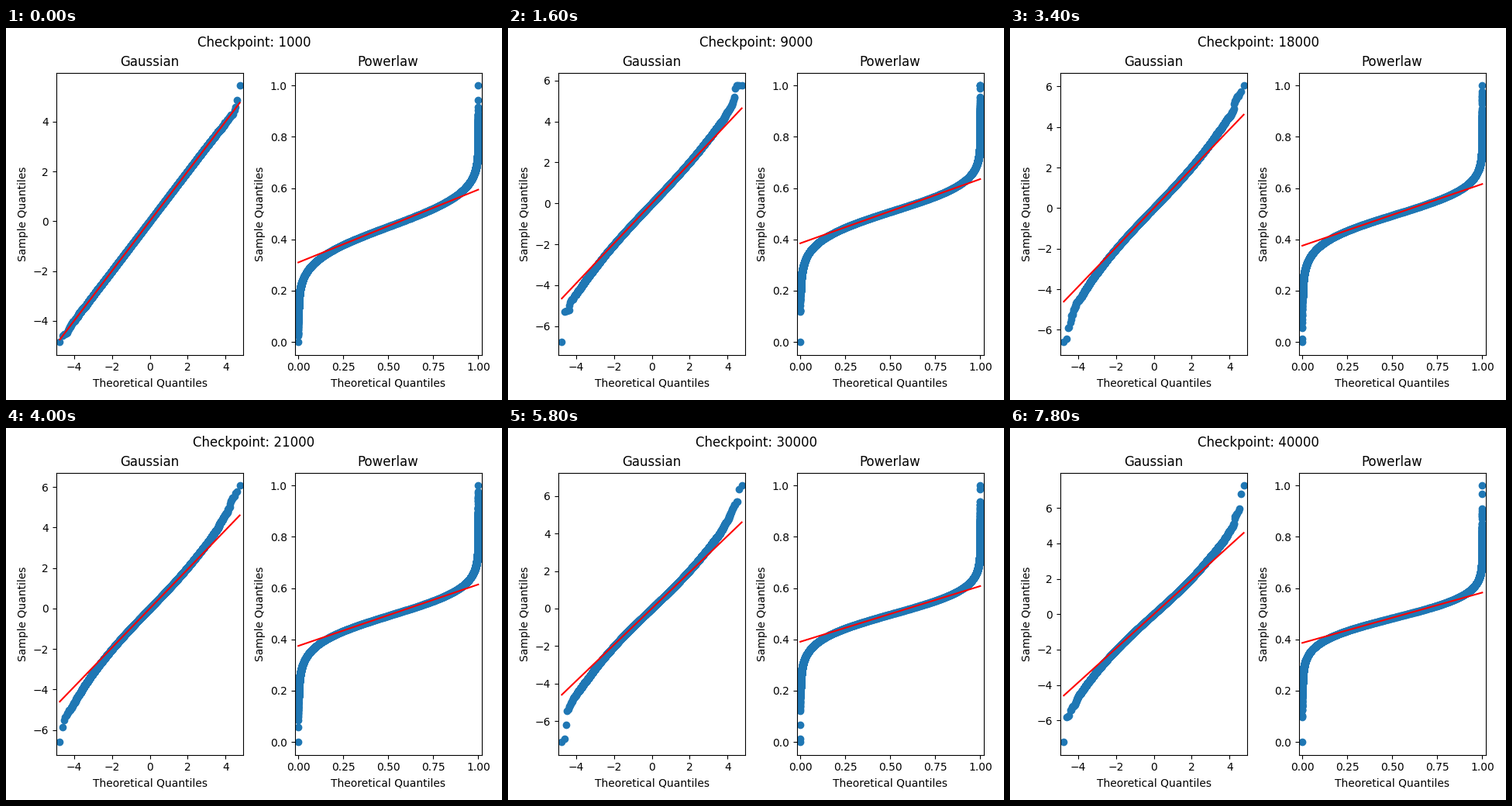
Write a matplotlib script that moves like this. It is 640 px wide and 480 px high and loops after 8000 ms.

```python
import math

import numpy as np
import matplotlib.pyplot as plt
from matplotlib.animation import FuncAnimation

FRAMES, STEP_MS = 40, 200
N = 1_000_000          # sample size behind the quantile plots
QUARTILE = 0.67449     # upper quartile of the standard normal

# Key points over the frames: smallest value, largest value, power-law exponent.
KEY = [0, 8, 13, 20, 24, 33, 39]
LOWEST = [-4.85, -6.77, -6.6, -6.6, -7.06, -7.16, -7.22]
HIGHEST = [5.45, 5.76, 6.0, 6.08, 6.07, 6.95, 7.27]
EXPONENT = [1.27, 1.56, 1.49, 1.49, 1.4, 1.44, 1.29]

# Inverse normal CDF for p <= 0.5, interpolated in log p.
Z_GRID = np.linspace(-6.5, 0, 3001)
LOG_P = np.log([0.5 * math.erfc(-z / math.sqrt(2)) for z in Z_GRID])


def half_ppf(p):
    return np.interp(np.log(p), LOG_P, Z_GRID)


def both_sides(low):
    return np.concatenate([low, -low[::-1]])


# Ranks counted from either end: every point in the tails, sparser inside.
RANKS = np.unique(np.round(np.geomspace(1, N / 2, 2000)))
P_LOW = RANKS / (N + 1)
PROB = np.concatenate([P_LOW, 1 - P_LOW[::-1]])
Z_THEORY = both_sides(half_ppf(P_LOW))


def bend(z, c):
    """Unit-variance quantile curve whose tails grow heavier with c."""
    s = math.sqrt(1 - 6 * c * c) - 3 * c
    outer = np.maximum(np.abs(z) - 4, 0) ** 2
    return s * z + c * z ** 3 + np.where(z < 0, -130, 60) * c * outer


def noisy_half(rng):
    """Normal order statistics of one random half of the sample."""
    r = np.cumsum(rng.gamma(np.diff(RANKS, prepend=0)))
    return half_ppf(r / N)


def sample(i, c):
    rng = np.random.default_rng(100 + i)
    z = np.concatenate([noisy_half(rng), -noisy_half(rng)[::-1]])
    low, high = np.interp(i, KEY, LOWEST), np.interp(i, KEY, HIGHEST)
    y = np.clip(np.sort(bend(z, c)), low, high)
    y[0], y[-1] = low, high
    return y


def qq(ax, x, y, xq, yq, title):
    """Quantile plot with the line through both quartiles."""
    ax.clear()
    ax.plot(x, y, "o", color="C0")
    slope = (yq[1] - yq[0]) / (xq[1] - xq[0])
    ends = np.array([x[0], x[-1]])
    ax.plot(ends, yq[0] + slope * (ends - xq[0]), "r-")
    ax.margins(x=0.02, y=0.05)
    ax.set(title=title, xlabel="Theoretical Quantiles",
           ylabel="Sample Quantiles")


fig, (left, right) = plt.subplots(1, 2, figsize=(6.4, 4.8), dpi=100)
heading = fig.suptitle("")


def draw(i):
    c = 0.013 * (1 - math.exp(-i / 7))
    y = sample(i, c)
    zq = np.array([-QUARTILE, QUARTILE])
    yq = bend(zq, c)
    heading.set_text(f"Checkpoint: {(i + 1) * 1000}")
    qq(left, Z_THEORY, y, zq, yq, "Gaussian")

    low, span = y[0], y[-1] - y[0]
    power = 1 / np.interp(i, KEY, EXPONENT)
    qq(right, PROB ** power, (y - low) / span,
       np.array([0.25, 0.75]) ** power, (yq - low) / span, "Powerlaw")
    return ()


# Lay the panels out once, so that they keep still while the data changes.
draw(FRAMES - 1)
fig.tight_layout()
fig.subplots_adjust(top=0.88)

anim = FuncAnimation(fig, draw, frames=FRAMES, interval=STEP_MS,
                     repeat=True, repeat_delay=0)
plt.show()
```
